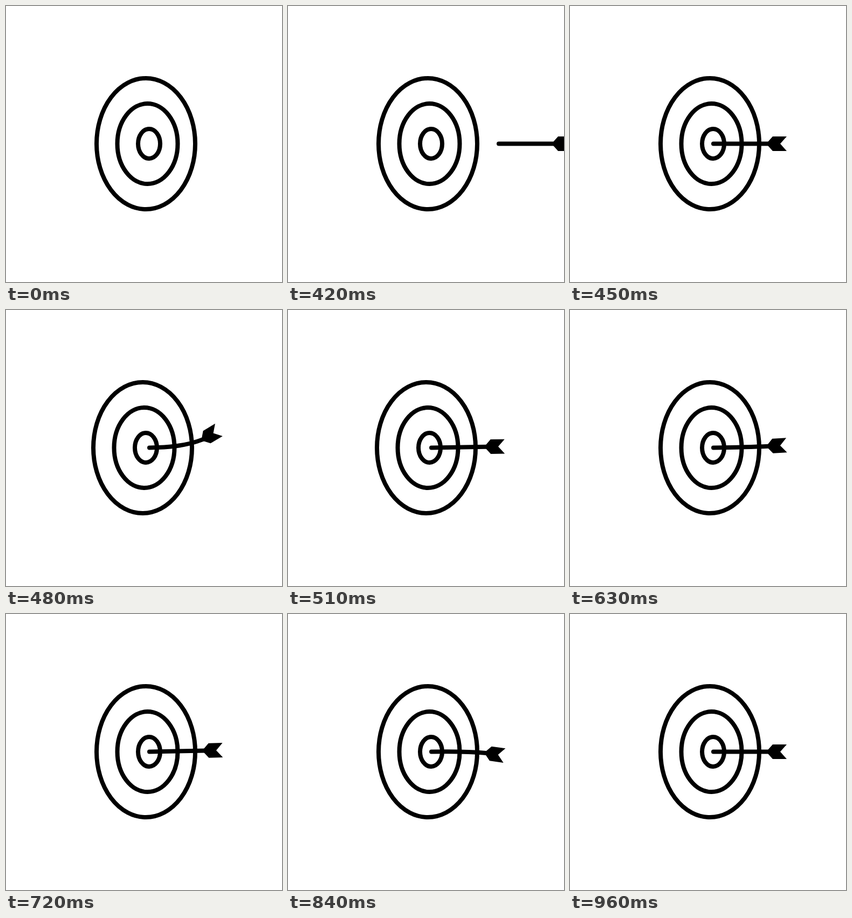
An HTML page that plays this animation: 512x512 px, repeating every 1800 ms.

```html
<!DOCTYPE html>
<html lang="en">
<head>
<meta charset="utf-8">
<title>Arrow hitting a target</title>
<style>
  html, body { margin: 0; width: 100%; height: 100%; overflow: hidden; background: #fff; }
  svg { display: block; width: 100%; height: 100%; }
  .line { fill: none; stroke: #000; stroke-width: 8; stroke-linecap: round; }
</style>
</head>
<body>
<svg viewBox="0 0 512 512">
  <g id="target" class="line">
    <ellipse cx="259.5" cy="255.5" rx="91.5" ry="121.5"/>
    <ellipse cx="262.5" cy="255.5" rx="56" ry="74.5"/>
    <ellipse cx="265.5" cy="255.5" rx="20.5" ry="27.5"/>
  </g>
  <!-- The arrow's origin is its tip; it points left. -->
  <g id="arrow">
    <path id="shaft" class="line"/>
    <path id="fletching" d="M34 -13.5H8L-4 0L8 13.5H34L22 0Z"/>
  </g>
</svg>
<script>
  const LOOP = 1800, STEP = 30;
  const TIP = { x: 266, y: 255.5 }, LENGTH = 102;
  const [target, arrow, shaft, fletching] =
    ['target', 'arrow', 'shaft', 'fletching'].map(id => document.getElementById(id));

  // Keys are [time in ms, value].
  const flight = [[390, 250], [450, 0]];
  const recoil = [[450, 0], [480, -6], [540, 0]];
  const tilt = [[450, 0], [480, -1], [840, -1], [960, 0]];
  const wobble = [[450, 0], [480, -1], [540, 1], [600, -0.8], [660, 0.65],
                  [750, -0.35], [840, 0.3], [960, 0]];

  function valueAt(keys, t) {
    const next = keys.findIndex(([time]) => time > t);
    if (next === 0) return keys[0][1];
    if (next < 0) return keys[keys.length - 1][1];
    const [t0, v0] = keys[next - 1], [t1, v1] = keys[next];
    return v0 + (v1 - v0) * (t - t0) / (t1 - t0);
  }

  function draw(t) {
    const bend = valueAt(wobble, t);
    const x = LENGTH - 2 * bend * bend, y = 13.9 * bend;
    target.setAttribute('transform', `translate(${valueAt(recoil, t)} 0)`);
    arrow.setAttribute('transform',
      `translate(${TIP.x + valueAt(flight, t)} ${TIP.y}) rotate(${valueAt(tilt, t)})`);
    shaft.setAttribute('d', `M0 0C${x / 3} 0 ${x * 2 / 3} ${y * 0.12} ${x} ${y}`);
    fletching.setAttribute('transform', `translate(${x} ${y}) rotate(${30 * bend})`);
    arrow.style.display = t < 420 ? 'none' : '';
  }

  const start = performance.now();
  function tick() {
    const t = (performance.now() - start) % LOOP;
    draw(Math.floor(t / STEP) * STEP);
    requestAnimationFrame(tick);
  }
  tick();
</script>
</body>
</html>
```
